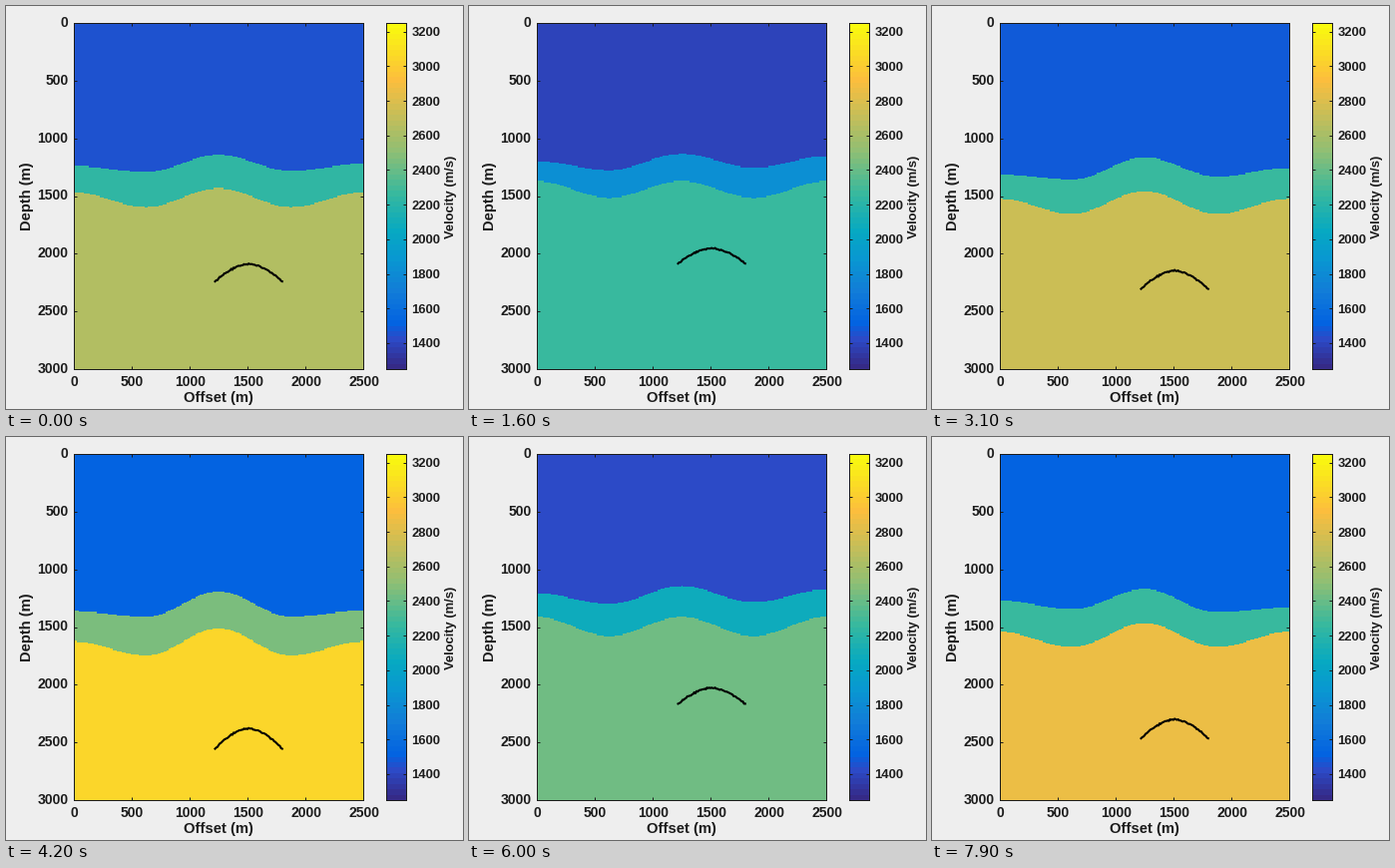
A matplotlib script for the animation above (8 s loop, 458 by 404 pixels).

```python
import numpy as np
import matplotlib.pyplot as plt
from matplotlib.animation import FuncAnimation
from matplotlib.colors import LinearSegmentedColormap

W, H, DPI = 458, 404, 64
PT = 72 / DPI  # points per pixel
FRAMES, STEP = 80, 100
INK = "#1c1c1c"
LEFT, RIGHT, TOP, BOTTOM = 68, 358, 17, 364
BAR_LEFT, BAR_RIGHT = 381, 401
VMIN, VMAX = 1250, 3250
CELL = 10

CMAP = LinearSegmentedColormap.from_list("velocity", [
    (0, "#352a87"), (5 / 63, "#2c4ac7"), (8 / 63, "#0363e1"), (14 / 63, "#127dd8"),
    (20 / 63, "#0998d1"), (25 / 63, "#07a9c2"), (32 / 63, "#38b99e"), (40 / 63, "#92bf73"),
    (53 / 63, "#fdbe3d"), (1, "#f9fb0e")], N=64)

# time: three velocities, upper interface (edge, trough, tilt), depth of the reflector
KEYS = {
    0: (1453, 2234, 2641, 1230, 1287, -20, 2090),
    1000: (1385, 1703, 2203, 1167, 1260, 30, 1975),
    2100: (1415, 1960, 2359, 1195, 1275, -100, 1948),
    4200: (1516, 2453, 3047, 1362, 1410, -5, 2380),
    5100: (1453, 2109, 2422, 1190, 1307, -10, 2132),
    6900: (1420, 2047, 2422, 1195, 1287, -50, 1983),
    7900: (1512, 2266, 2859, 1300, 1360, 60, 2302),
}
TIMES = np.array(list(KEYS), float)
VALUES = np.array(list(KEYS.values()), float)
GAPS = np.diff(TIMES)[:, None]
RATES = np.diff(VALUES, axis=0) / GAPS


def key_slopes():
    """Monotone slopes: flat at every local extreme."""
    a, b = RATES[:-1], RATES[1:]
    same = a * b > 0
    inner = np.where(same, 2 * a * b / np.where(same, a + b, 1), 0)
    return np.vstack([RATES[:1], inner, RATES[-1:]])


SLOPES = key_slopes()


def model_at(t):
    k = min(np.searchsorted(TIMES, t, side="right") - 1, len(TIMES) - 2)
    gap = GAPS[k, 0]
    u = (t - TIMES[k]) / gap
    return ((2 * u**3 - 3 * u**2 + 1) * VALUES[k] + (3 * u**2 - 2 * u**3) * VALUES[k + 1]
            + gap * ((u**3 - 2 * u**2 + u) * SLOPES[k] + (u**3 - u**2) * SLOPES[k + 1]))


xs = np.arange(250) * CELL + CELL / 2
zs = np.arange(300)[:, None] * CELL + CELL / 2
arc_x = np.arange(1220, 1801, CELL)
rough = np.random.default_rng(4).normal(0, 3, arc_x.size)


def interface(edge, trough, crest, tilt=0):
    """Cosine waves: edge, trough, crest, trough, edge."""
    knots = np.array([edge, trough, crest, trough, edge]) + tilt * np.linspace(-0.5, 0.5, 5)
    pos = xs / 625
    k = pos.astype(int)
    ease = (1 - np.cos(np.pi * (pos - k))) / 2
    return knots[k] + (knots[k + 1] - knots[k]) * ease


def layers(v0, v1, v2, edge, trough, tilt):
    crest = 628 + 0.4 * trough
    upper = interface(edge, trough, crest, tilt)
    # the middle layer thickens with its velocity
    lower = interface(edge + 0.107 * v1, trough + 0.138 * v1, crest + 0.13 * v1)
    return np.where(zs < upper, v0, np.where(zs < lower, v1, v2))


def arc(crest, v2):
    z = crest + 0.0575 * v2 * (np.abs(arc_x - 1510) / 290) ** 1.8
    return np.round((z + rough) / 5) * 5


fig = plt.figure(figsize=(W / DPI, H / DPI), dpi=DPI, facecolor="#eeeeee")


def panel(x0, x1):
    ax = fig.add_axes([x0 / W, 1 - BOTTOM / H, (x1 - x0) / W, (BOTTOM - TOP) / H])
    ax.tick_params(direction="in", length=3 * PT, width=PT, color=INK, top=True, right=True,
                   labelbottom=False, labelleft=False)
    for spine in ax.spines.values():
        spine.set(linewidth=PT, color=INK)
    return ax


def label(x, y, s, size, ha="center", rotation=0):
    fig.text(x / W, 1 - y / H, s, size=size * PT, ha=ha, va="baseline", rotation=rotation,
             rotation_mode="anchor", family="Liberation Sans", weight="bold", color=INK)


*shape, reef = model_at(0)
ax = panel(LEFT, RIGHT)
image = ax.imshow(layers(*shape), cmap=CMAP, vmin=VMIN, vmax=VMAX, aspect="auto",
                  interpolation="nearest", extent=(0, 2500, 3000, 0))
line, = ax.plot(arc_x, arc(reef, shape[2]), color="black", lw=2.1 * PT)
ax.set(xlim=(0, 2500), ylim=(3000, 0), xticks=range(0, 2501, 500), yticks=range(0, 3001, 500))
for v in range(0, 2501, 500):
    label(LEFT + 0.5 + v / 2500 * (RIGHT - LEFT), 381, str(v), 14)
for v in range(0, 3001, 500):
    label(62.5, TOP + v / 3000 * (BOTTOM - TOP) + 4, str(v), 14, "right")
label(213, 397, "Offset (m)", 14.8)
label(25.5, 191, "Depth (m)", 14.8, rotation=90)

bar = panel(BAR_LEFT, BAR_RIGHT)
bar.imshow(np.arange(64)[:, None], cmap=CMAP, aspect="auto", origin="lower",
           interpolation="nearest", extent=(0, 1, VMIN, VMAX))
bar.set(xticks=[], yticks=range(1400, 3201, 200))
for v in range(1400, 3201, 200):
    label(406.5, BOTTOM - (v - VMIN) / (VMAX - VMIN) * (BOTTOM - TOP) + 4.5, str(v), 13, "left")
label(449, 191.5, "Velocity (m/s)", 13, rotation=90)


def update(i):
    *shape, reef = model_at(i * STEP)
    image.set_data(layers(*shape))
    line.set_ydata(arc(reef, shape[2]))
    return image, line


anim = FuncAnimation(fig, update, frames=FRAMES, interval=STEP, repeat=True, repeat_delay=0)
plt.show()
```
